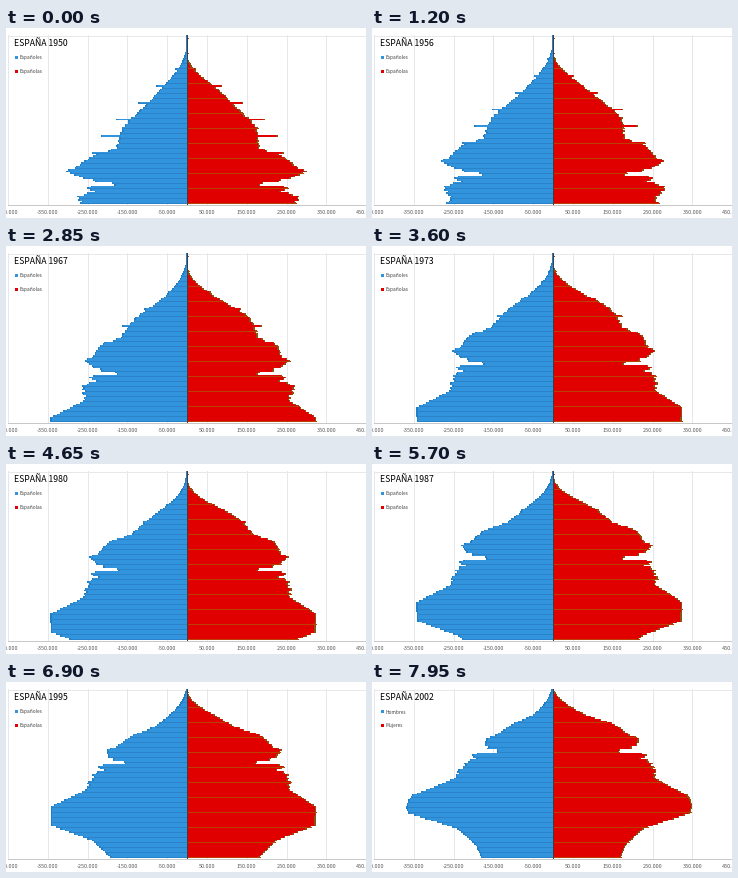
Write a matplotlib script that moves like this. It is 360x190 px and loops after 8000 ms.

```python
import numpy as np
import matplotlib.pyplot as plt
from matplotlib.animation import FuncAnimation

W, H, DPI = 360, 190, 100
PT = 72 / DPI
STEP_MS, LOOP_MS, HOLD_MS = 50, 8000, 450
CENTER, TOP, BASE = 181, 7, 176
PX_PER_100K = 39.8
FONT = "Noto Sans CJK JP"
BLUE, BLUE_TIP, BLUE_STRIPE = "#3194dd", "#1f7fc6", "#2a82c8"
RED, RED_TIP, RED_STRIPE = "#e00000", "#8a5212", "#b84000"

AGES = np.arange(101)
EDGES = np.linspace(BASE, TOP, len(AGES) + 1)
JITTER = np.random.default_rng(5).uniform(-.02, .02, 160)


def bump(x, middle, spread):
    return np.exp(-((x - middle) / spread) ** 2)


def fade(year, start, end):
    """Fall from 1 to 0 between two years."""
    return np.clip((end - year) / (end - start), 0, 1)


def births(born):
    """Length of a male bar, in pixels, before mortality and migration."""
    size = np.interp(
        born, [1890, 1905, 1917, 1922, 1942, 1955, 1965, 1976, 1985, 1995, 2002],
        [53, 68, 71, 91, 97, 104, 137, 136, 95, 77, 72])
    size *= 1 + .09 * bump(born, 1931, 2.5)    # second republic
    size *= 1 - .09 * bump(born, 1936.5, 1.5)  # civil war
    size *= 1 - .32 * bump(born, 1938.6, .9)
    size *= 1 - .07 * bump(born, 1943, 1.2)
    return size * (1 + JITTER[born - 1850] * (born < 1955))


def alive(age, scale, shape):
    return np.exp(-(age / scale) ** shape)


def pyramid(year):
    """Bar lengths in pixels for men and women by age."""
    born = year - AGES
    size = births(born)
    # Ages reported in round numbers, then migration out and in
    rounding = np.interp(born, [1910, 1930], [.27, 0]) * (born % 10 == 0)
    size *= 1 + rounding * np.exp((1950 - year) / 18)
    size *= 1 + .17 * fade(year, 1950, 1962) * bump(born, 1930, 7)
    size *= 1 + .10 * fade(year, 1962, 1973) * bump(born, 1947, 3)
    size *= 1 + .08 * (1 - fade(year, 1996, 2002)) * bump(born, 1972, 9)
    # Older generations age faster
    older = np.maximum(0, 1922 - born)
    ratio = np.interp(born, [1890, 1905, 1930, 1948, 1965],
                      [1, 1.04, .99, 1.03, .945])
    men = size * alive(AGES + .22 * older, 82.6, 5.4)
    women = size * ratio * alive(AGES + .35 * older, 89.5, 7.5)
    return np.maximum(men, .6), np.maximum(women, .6)


fig = plt.figure(figsize=(W / DPI, H / DPI), dpi=DPI, facecolor="white")
ax = fig.add_axes([0, 0, 1, 1])
ax.set(xlim=(0, W), ylim=(H, 0))
ax.axis("off")


def label(x, y, text, px, color, ha="left"):
    return ax.text(x, y, text, fontsize=px * PT, color=color, ha=ha,
                   va="baseline", family=FONT, zorder=6)


def line(xs, ys, color, zorder):
    ax.plot(xs, ys, color=color, lw=PT, zorder=zorder)


for value in range(-450, 451, 100):
    x = CENTER + value * PX_PER_100K / 100
    line([x, x], [TOP, BASE], "#e4e7ee", 0)
    label(x, 186, f"{value}.000", 5.5, "#595959", "center")
line([2, W], [TOP + .5] * 2, "#e8e8e8", 1)
line([2, W], [BASE + .5] * 2, "#c8c8c8", 1)
line([CENTER] * 2, [TOP, BASE], "#4a3a40", 5)


class Side:
    def __init__(self, sign, fill, tip, stripe, stripe_step):
        self.sign, self.stripe_step = sign, stripe_step
        self.tips, self.body = (
            ax.stairs(np.full(len(AGES), CENTER), EDGES, baseline=CENTER,
                      orientation="horizontal", fill=True, color=color, lw=0,
                      antialiased=False, zorder=z)
            for color, z in ((tip, 2), (fill, 3)))
        self.stripes = ax.hlines([], CENTER, CENTER, colors=stripe, lw=PT,
                                 antialiased=False, zorder=4)

    def update(self, lengths):
        ends = CENTER + self.sign * lengths
        self.tips.set_data(values=ends)
        self.body.set_data(
            values=CENTER + self.sign * np.maximum(lengths - 1.5, 0))
        rows = EDGES[:-1] - .8
        step = self.stripe_step
        self.stripes.set_segments([[(CENTER, y), (x, y)] for x, y
                                   in zip(ends[::step], rows[::step])])


men_side = Side(-1, BLUE, BLUE_TIP, BLUE_STRIPE, 3)
women_side = Side(1, RED, RED_TIP, RED_STRIPE, 9)

title = label(8.5, 18, "", 8.7, "black")
legend = []
for y, color in ((30, BLUE), (44, RED)):
    ax.add_patch(plt.Rectangle((9, y - 2), 3, 3, color=color, lw=0, zorder=6))
    legend.append(label(14, y + 1.5, "", 4.8, "#404040"))


def year_at(ms):
    step = 0 if ms < HOLD_MS else (ms - HOLD_MS) // 150 + 1
    return 1950 + step + (step >= 21)  # 1971 is skipped


def draw(frame):
    year = year_at(frame * STEP_MS)
    men, women = pyramid(year)
    men_side.update(men)
    women_side.update(women)
    title.set_text(f"ESPAÑA {year}")
    names = ("Españoles", "Españolas") if year < 1999 else ("Hombres", "Mujeres")
    for text, name in zip(legend, names):
        text.set_text(name)
    return []


anim = FuncAnimation(fig, draw, frames=LOOP_MS // STEP_MS, interval=STEP_MS,
                     repeat=True, repeat_delay=0, blit=False)
plt.show()
```
